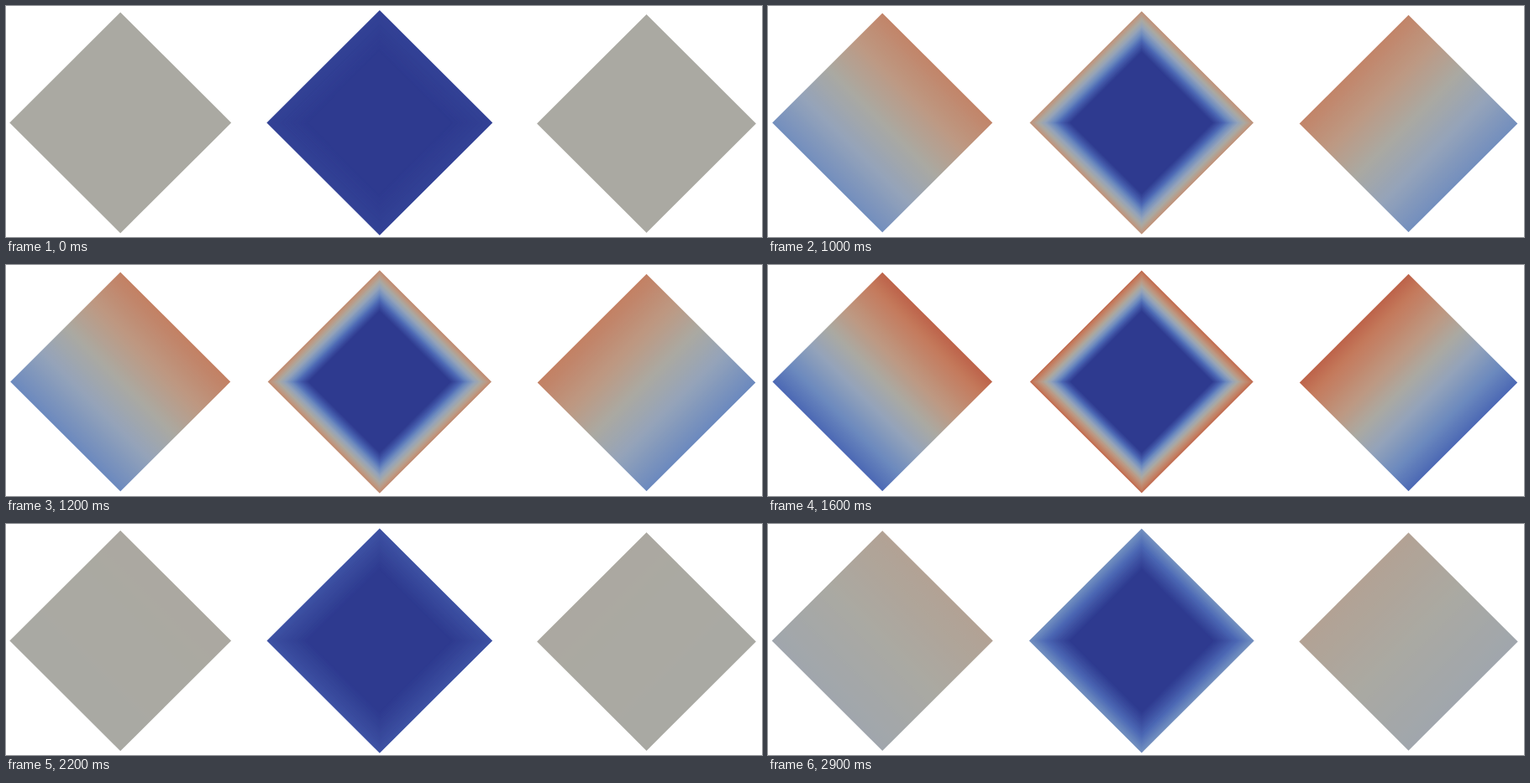
An HTML page for the animation above (3000 ms loop, 900 px wide and 276 px high).

```html
<!DOCTYPE html>
<html lang="en">
<head>
<meta charset="utf-8">
<title>Three diamonds</title>
<style>
html, body { margin: 0; width: 100%; height: 100%; overflow: hidden; background: #fff; }
svg { display: block; width: 100vw; height: 100vh; }
</style>
</head>
<body>
<svg id="stage" viewBox="0 0 900 276">
  <defs>
    <linearGradient id="rise" x1=".25" y1=".75" x2=".75" y2=".25"></linearGradient>
    <linearGradient id="fall" x1=".75" y1=".75" x2=".25" y2=".25"></linearGradient>
  </defs>
  <polygon id="left" fill="url(#rise)"/>
  <g id="middle"></g>
  <polygon id="right" fill="url(#fall)"/>
</svg>
<script>
const FRAME = 100, COUNT = 30, CORE = 0.635, RINGS = 60, STOPS = 32;

// Colour scale: position, red, green, blue
const SCALE = [
  [0, 46, 58, 143], [0.1, 62, 82, 163], [0.18, 76, 104, 180],
  [0.28, 108, 138, 190], [0.4, 148, 163, 186], [0.5, 170, 169, 162],
  [0.6, 189, 153, 131], [0.75, 196, 122, 92], [0.87, 184, 82, 60],
  [1, 150, 22, 30]
];

// Load steps play in text order: 1, 10, 11 ... 19, 2, 20 ...
const order = Array.from({ length: COUNT }, (_, i) => i + 1).sort();

const $ = id => document.getElementById(id);

function add(parent, tag) {
  const el = document.createElementNS("http://www.w3.org/2000/svg", tag);
  return parent.appendChild(el);
}

function colour(v) {
  v = Math.min(1, Math.max(0, v));
  let i = 1;
  while (v > SCALE[i][0]) i++;
  const a = SCALE[i - 1], b = SCALE[i];
  const k = (v - a[0]) / (b[0] - a[0]);
  const mix = c => Math.round(a[c] + (b[c] - a[c]) * k);
  return `rgb(${mix(1)},${mix(2)},${mix(3)})`;
}

function diamond(el, x, y, r) {
  el.setAttribute("points", `${x},${y - r} ${x + r},${y} ${x},${y + r} ${x - r},${y}`);
}

const ramps = ["rise", "fall"].map(id =>
  Array.from({ length: STOPS + 1 }, (_, i) => {
    const stop = add($(id), "stop");
    stop.setAttribute("offset", i / STOPS);
    return stop;
  }));
const rings = Array.from({ length: RINGS + 1 }, () => add($("middle"), "polygon"));

function draw(load) {
  const spread = 0.5 * load * load;
  for (const ramp of ramps) {
    ramp.forEach((stop, i) =>
      stop.setAttribute("stop-color", colour(0.5 + spread * (2 * i / STOPS - 1))));
  }
  diamond($("left"), 136.2, 139.5, 132 - 1.5 * load);
  diamond($("right"), 762.5, 140.5, 130.5 - load);

  const size = 134.5 - 2 * load;
  rings.forEach((ring, i) => {
    const depth = i / RINGS;
    diamond(ring, 444.8, 139.5, size * (1 - depth * (1 - CORE)));
    ring.setAttribute("fill", colour(load * (1 - depth)));
  });
}

let shown = -1;
const start = performance.now();

function tick() {
  const t = Math.max(0, performance.now() - start);
  const frame = Math.floor(t / FRAME) % COUNT;
  if (frame !== shown) {
    shown = frame;
    draw(order[frame] / COUNT);
  }
  requestAnimationFrame(tick);
}
tick();
</script>
</body>
</html>
```
